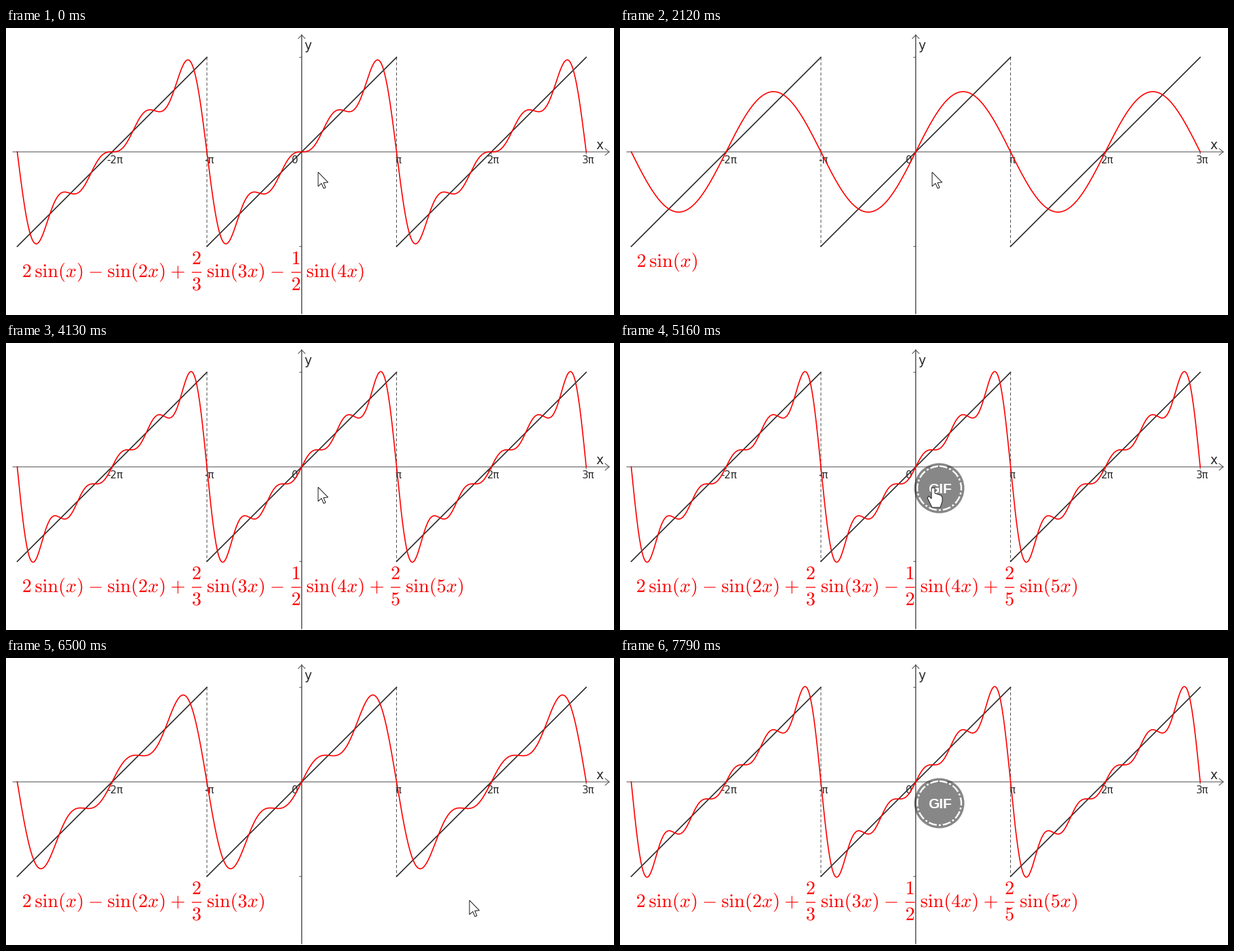
A matplotlib script for the animation above (8690 ms loop, 896 by 424 pixels).

```python
import numpy as np
import matplotlib.pyplot as plt
from matplotlib.animation import FuncAnimation
from matplotlib.patches import Circle, PathPatch, Polygon
from matplotlib.path import Path
from matplotlib.textpath import TextPath

W, H, DPI = 896, 424, 64
PT = 72 / DPI                      # points per pixel
LOOP, STEP = 8690, 22
X0, Y0, HALF = 435.8, 183, 139.75  # origin and the pixel length of pi
EM = 28.15
MAX_TERMS = 5
RED, INK, GREY = "#ff0000", "#2a2a2a", "#4a4a4a"

# Each play adds one term per beat, then shows the badge: (start, beat)
PLAYS = [(-1680, 460), (2120, 502), (5430, 472)]
HAND_START, HAND_END = 5160, 5430

# Eased pointer moves: (start, end, destination)
POINTER_HOME = (460, 213)
MOVES = [(6080, 6560, (690, 362)), (6880, 7140, (700, 390)), (7600, 7790, (740, 440))]

ARROW = 1.25 * np.array([(0, 0), (0, 16.8), (3.9, 13.2), (6.5, 19.2),
                         (8.8, 18.2), (6.3, 12.4), (11.7, 12)])
HAND = np.array([(-1, 1), (4, 1), (4, 9), (13, 12), (15, 15), (15, 21),
                 (12, 30), (0, 30), (-7, 16), (-5, 13), (-1, 17)])

plt.rcParams["mathtext.fontset"] = "cm"
plt.rcParams["font.family"] = "DejaVu Sans"

fig = plt.figure(figsize=(W / DPI, H / DPI), dpi=DPI, facecolor="white")
ax = fig.add_axes([0, 0, 1, 1])
ax.set_xlim(0, W)
ax.set_ylim(H, 0)
ax.axis("off")


def line(xs, ys, color, width, **kw):
    return ax.plot(xs, ys, color=color, lw=width * PT, snap=False, **kw)[0]


def label(x, y, text, size, color=INK, **kw):
    return ax.text(x, y, text, fontsize=size * PT, color=color, va="baseline", **kw)


def partial_sum(n):
    x = np.linspace(-3 * np.pi, 3 * np.pi, 840)
    y = sum(2 * (-1) ** (k + 1) / k * np.sin(k * x) for k in range(1, n + 1))
    scale = HALF / np.pi
    return X0 + x * scale, Y0 - y * scale


def formula(n):
    """Outline of the first n terms, set with TeX's display spacing."""
    left, base = (24.6, 353) if n < 3 else (23.8, 368)
    parts = []

    def put(tex, em, rise=0.0):
        p = TextPath((0, 0), f"${tex}$", size=EM)
        offset = (left + em * EM, base - rise * EM)
        parts.append(Path(p.vertices * (1, -1) + offset, p.codes))

    def bar(em):
        a, b = left + em * EM, left + (em + 0.5) * EM
        y = base - 0.25 * EM
        parts.append(Path([(a, y - .65), (b, y - .65), (b, y + .65),
                           (a, y + .65), (a, y - .65)], closed=True))

    put("2", 0)
    put(r"\sin(x)", 0.667)
    pen = 3.244
    for k in range(2, n + 1):
        put("+" if k % 2 else "-", pen + 0.222)
        pen += 1.222
        if k > 2:
            common = np.gcd(2, k)
            put(2 // common, pen + 0.12, 0.677)
            put(k // common, pen + 0.12, -0.686)
            bar(pen + 0.12)
            pen += 0.907
        put(rf"\sin({k}x)", pen)
        pen += 3.078
    return Path.make_compound_path(*parts)


# Axes
line([10, 889], [Y0, Y0], GREY, 1)
line([883, 889, 883], [178, Y0, 188], GREY, 1)
line([X0, X0], [10, 422], INK, 1.2)
line([X0 - 5, X0, X0 + 5], [15.5, 10.5, 15.5], GREY, 1)
for side in (-1, 1):
    line([X0 - 3, X0], [Y0 + side * HALF] * 2, GREY, 1)
label(869.5, 179, "x", 18.5)
label(439, 32, "y", 18.5)
label(420.5, 200, "0", 15)
for m in (-2, -1, 1, 2, 3):
    x = X0 + m * HALF
    line([x, x], [Y0, Y0 + 3], GREY, 1)
    text = f"{m}π".replace("1", "")
    label(x + 1.3 + len(text), 200, text, 15, ha="center")

# Sawtooth
for m in (-1, 1):
    line([X0 + m * HALF] * 2, [Y0 - HALF, Y0 + HALF], GREY, 1, dashes=(4.5, 3))
for m in (-2, 0, 2):
    mid = X0 + m * HALF
    line([mid - HALF, mid + HALF], [Y0 + HALF, Y0 - HALF], INK, 1.65)

CURVES = {n: partial_sum(n) for n in range(1, MAX_TERMS + 1)}
FORMULAS = {n: formula(n) for n in CURVES}
curve = line([], [], RED, 1.65, zorder=4)
equation = ax.add_patch(PathPatch(FORMULAS[1], fc=RED, ec="none", zorder=5))

# Play badge
CENTER = (470.5, 214.5)
badge = [
    ax.add_patch(Circle(CENTER, 37, fc="#222222", ec="none", alpha=0.54, zorder=6)),
    ax.add_patch(Circle(CENTER, 32.4, fill=False, ec="white", lw=2.4 * PT,
                        ls=(0, (5, 1.3, 1.2, 1.3)), zorder=7)),
    label(471.5, 222, "GIF", 21, "white", family="Liberation Sans",
          weight="bold", ha="center", zorder=7),
]
pointer = ax.add_patch(Polygon(ARROW, closed=True, fc="white", ec="#1a1a1a",
                               lw=PT, joinstyle="miter", zorder=8))


def smoothstep(u):
    u = np.clip(u, 0, 1)
    return u * u * (3 - 2 * u)


def pointer_tip(t):
    tip = np.array(POINTER_HOME, float)
    for start, end, goal in MOVES:
        tip += (goal - tip) * smoothstep((t - start) / (end - start))
    return tip.round()


def update(frame):
    t = (frame + 1) * STEP - 1
    start, beat = max(play for play in PLAYS if play[0] <= t)
    stage = 1 + (t - start) // beat
    n = min(stage, MAX_TERMS)
    curve.set_data(*CURVES[n])
    equation.set_path(FORMULAS[n])
    for part in badge:
        part.set_visible(stage > MAX_TERMS)
    shape = HAND if HAND_START <= t < HAND_END else ARROW
    pointer.set_xy(shape + pointer_tip(t))
    return [curve, equation, pointer, *badge]


anim = FuncAnimation(fig, update, frames=LOOP // STEP, interval=STEP,
                     repeat=True, repeat_delay=0, blit=False)
plt.show()
```
